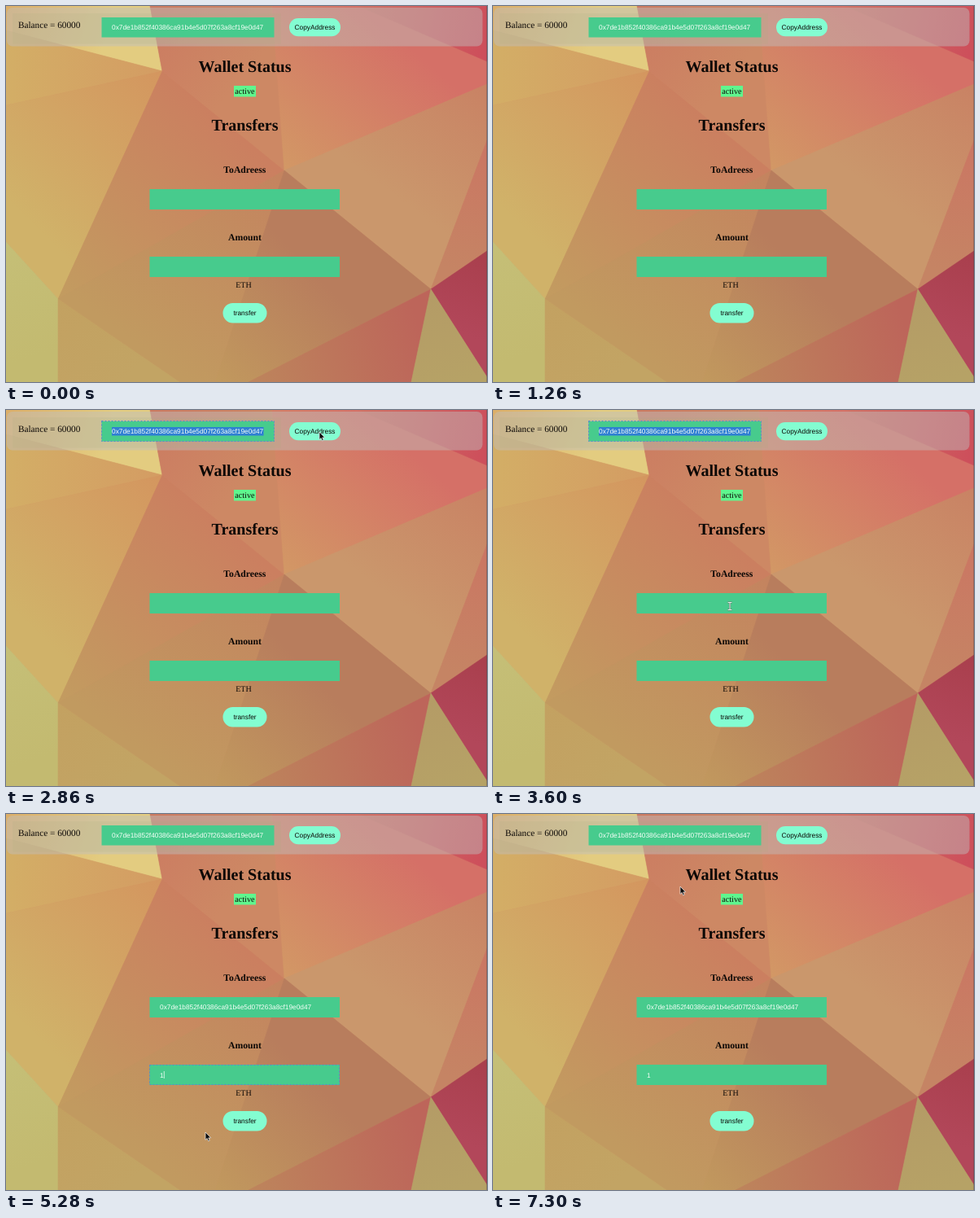
Animation of 591x462 px, one loop 8000 ms. Source, as an HTML page with a canvas:

```html
<!DOCTYPE html>
<html lang="en">
<head>
<meta charset="utf-8">
<title>Wallet</title>
<style>
  html, body { margin: 0; width: 100%; height: 100%; overflow: hidden; background: #c98862; }
  canvas, svg { position: absolute; left: 0; top: 0; width: 591px; height: 462px; }
  text { text-rendering: geometricPrecision; fill: #0c0806; }
  .serif { font: 10px "Liberation Serif", "Times New Roman", serif; text-anchor: middle; }
  .h1 { font-size: 20px; font-weight: bold; }
  .h3 { font-size: 11.7px; font-weight: bold; }
  .sans { font: 8.33px "Liberation Sans", Arial, sans-serif; }
  .mid { text-anchor: middle; }
  .val { fill: #f6fff8; }
  .field { fill: #47cb8d; }
  .btn { fill: #83fdd1; }
  .ring { fill: none; stroke: #5b88cc; stroke-dasharray: 2 2; }
  .caret { fill: #f2fff6; }
</style>
</head>
<body>
<canvas id="bg" width="591" height="462"></canvas>
<svg viewBox="0 0 591 462">
  <rect x="1" y="2" width="584.5" height="47.5" rx="7" fill="#bebebe" fill-opacity=".46"/>
  <rect x="8" y="9" width="330" height="37.5" fill="#a3a878" fill-opacity=".14"/>
  <path d="M590.5 0V462" stroke="#4a3a3c" stroke-opacity=".35"/>

  <text class="serif" x="15" y="27.1" style="font-size:11.25px;text-anchor:start">Balance = 60000</text>
  <rect class="field" x="117.5" y="14" width="212" height="24.5"/>
  <rect id="selection" x="130" y="21" width="186.5" height="10.5" fill="#2f7fd3"/>
  <text class="sans val address" x="130" y="29"></text>
  <rect class="btn" x="348" y="15" width="63" height="22.3" rx="11.1"/>
  <text class="sans mid" x="379.5" y="29">CopyAddress</text>

  <text class="serif h1" x="293.5" y="80.8">Wallet Status</text>
  <rect x="280" y="98" width="27" height="13.5" fill="#5ff68e"/>
  <text class="serif" x="293.4" y="108.3" style="font-size:10.2px">active</text>
  <text class="serif h1" x="293.5" y="153">Transfers</text>

  <text class="serif h3" x="293.3" y="205">ToAdreess</text>
  <rect class="field" x="176.5" y="225" width="233.5" height="25"/>
  <text id="pasted" class="sans val address" x="189" y="240.3"></text>

  <text class="serif h3" x="293.5" y="288">Amount</text>
  <rect class="field" x="176.5" y="308" width="233.5" height="25"/>
  <text id="amount" class="sans val" x="189" y="323.5">1</text>
  <text class="serif" x="292" y="346.3">ETH</text>
  <rect class="btn" x="266.5" y="365" width="54" height="24.5" rx="12.2"/>
  <text class="sans mid" x="293.5" y="380">transfer</text>

  <rect id="ring1" class="ring" x="117.5" y="13.5" width="212" height="25"/>
  <rect id="ring2" class="ring" x="176.5" y="225.5" width="233" height="24"/>
  <rect id="ring3" class="ring" x="176.5" y="308.5" width="233" height="24"/>
  <rect id="caret1" class="caret" x="189" y="233" width=".8" height="9"/>
  <rect id="caret2" class="caret" x="375.8" y="233" width=".8" height="9"/>
  <rect id="caret3" class="caret" x="189" y="316" width=".8" height="9"/>
  <rect id="caret4" class="caret" x="193.8" y="316" width=".8" height="9"/>

  <g id="cursor">
    <path id="arrow" d="M0 0V9.4L2.1 7.5 3.6 10.9 5.2 10.2 3.8 6.9H6.7Z" fill="#0a0a0a" stroke="#f4f4f4" stroke-width=".7"/>
    <g id="beam" fill="none">
      <path d="M-2.6 -4.5H2.6M0 -4.5V4.5M-2.6 4.5H2.6" stroke="#5d7a6b" stroke-width="2.2"/>
      <path d="M-2.4 -4.5H2.4M0 -4.5V4.5M-2.4 4.5H2.4" stroke="#dff2e6"/>
    </g>
  </g>
</svg>
<script>
const W = 591, H = 462, LOOP = 8000, TICK = 105;
const ADDRESS = '0x7de1b852f40386ca91b4e5d07f263a8cf19e0d47';
const $ = id => document.getElementById(id);

document.querySelectorAll('.address').forEach(el => { el.textContent = ADDRESS; });

// Facet corners, lettered clockwise along the border, then the inner ones
const corners = [
  ...[0, 177, 327, 433, W].map(x => [x, 0]),      // a-e
  ...[68, 96, 165, 301, 456, H].map(y => [W, y]), // f-k
  ...[498, 298, 257, 213, 64, 0].map(x => [x, H]), // l-q
  ...[290, 122, 30].map(y => [0, y]),             // r-t
  [192, 80], [342, 202], [522, 348], [64, 360]    // u-x
];
const corner = letter => corners[letter.charCodeAt(0) - 97];

// Shades from the first corner towards the middle of the others
const ctx = $('bg').getContext('2d');
function facet(letters, from, to) {
  const [first, ...rest] = [...letters].map(corner);
  const mid = [0, 1].map(k => rest.reduce((sum, p) => sum + p[k], 0) / rest.length);
  const paint = ctx.createLinearGradient(...first, ...mid);
  paint.addColorStop(0, from);
  paint.addColorStop(1, to);
  ctx.fillStyle = ctx.strokeStyle = paint;
  ctx.lineWidth = 0.6;
  ctx.beginPath();
  [first, ...rest].forEach(p => ctx.lineTo(...p));
  ctx.closePath();
  ctx.fill();
  ctx.stroke();
}
facet('abut', '#dcae68', '#e3cc80');
facet('ust', '#d49c63', '#d3ae66');
facet('uxrs', '#d4965f', '#d0b269');
facet('rxpq', '#c5bf77', '#c3ba70');
facet('xuv', '#c29c60', '#cb7f60');
facet('vnox', '#c4835f', '#c19a60');
facet('xop', '#c3a161', '#c2a464');
facet('bcvu', '#cb7a61', '#cd8864');
facet('vcdfg', '#d29865', '#d57067');
facet('def', '#d07265', '#cd4f5b');
facet('ghwv', '#c98264', '#ca976c');
facet('hiw', '#cb7663', '#c58464');
facet('nvwm', '#c1995e', '#b87d5d');
facet('mwl', '#bd855c', '#bd655a');
facet('iwj', '#a93f4d', '#b2475a');
facet('wjkl', '#b49b66', '#b6a266');

const play = (id, frames) => $(id).animate(frames, { duration: LOOP, iterations: Infinity });

// Visible from one time to another; hidden = true turns it round
function show(id, from, to = LOOP, hidden = false) {
  const inside = hidden ? 0 : 1;
  play(id, [0, from, to, LOOP].map((t, i) => ({
    offset: t / LOOP,
    opacity: i === 1 ? inside : 1 - inside,
    easing: 'step-end'
  })));
}

const copy = 2440, focus = 3700, paste = 4020, pick = 4440, type = 4760, send = 6240;
show('selection', copy, focus);
show('ring1', copy, focus);
show('ring2', focus, pick);
show('ring3', pick, send);
show('caret1', focus, paste);
show('caret2', paste, pick);
show('caret3', pick, type);
show('caret4', type, send);
show('pasted', paste);
show('amount', type);
show('beam', 3600, type + TICK);
show('arrow', 3600, type + TICK, true);

// Pointer moves: start, end, target; the pointer jumps once per tick
const moves = [
  [1260, 2000, 385, 27],
  [3170, 3600, 291, 241],
  [paste, 4340, 288, 322],
  [type, 5080, 245, 391],
  [5280, 6020, 308, 380],
  [6440, 7300, 230, 89]
];
let spot = 'translate(470px, -16px)';
const path = [{ offset: 0, transform: spot }];
for (const [start, end, x, y] of moves) {
  const ticks = Math.round((end - start) / TICK);
  path.push({ offset: start / LOOP, transform: spot, easing: `steps(${ticks}, end)` });
  spot = `translate(${x}px, ${y}px)`;
  path.push({ offset: end / LOOP, transform: spot });
}
play('cursor', [...path, { offset: 1, transform: spot }]);
</script>
</body>
</html>
```
